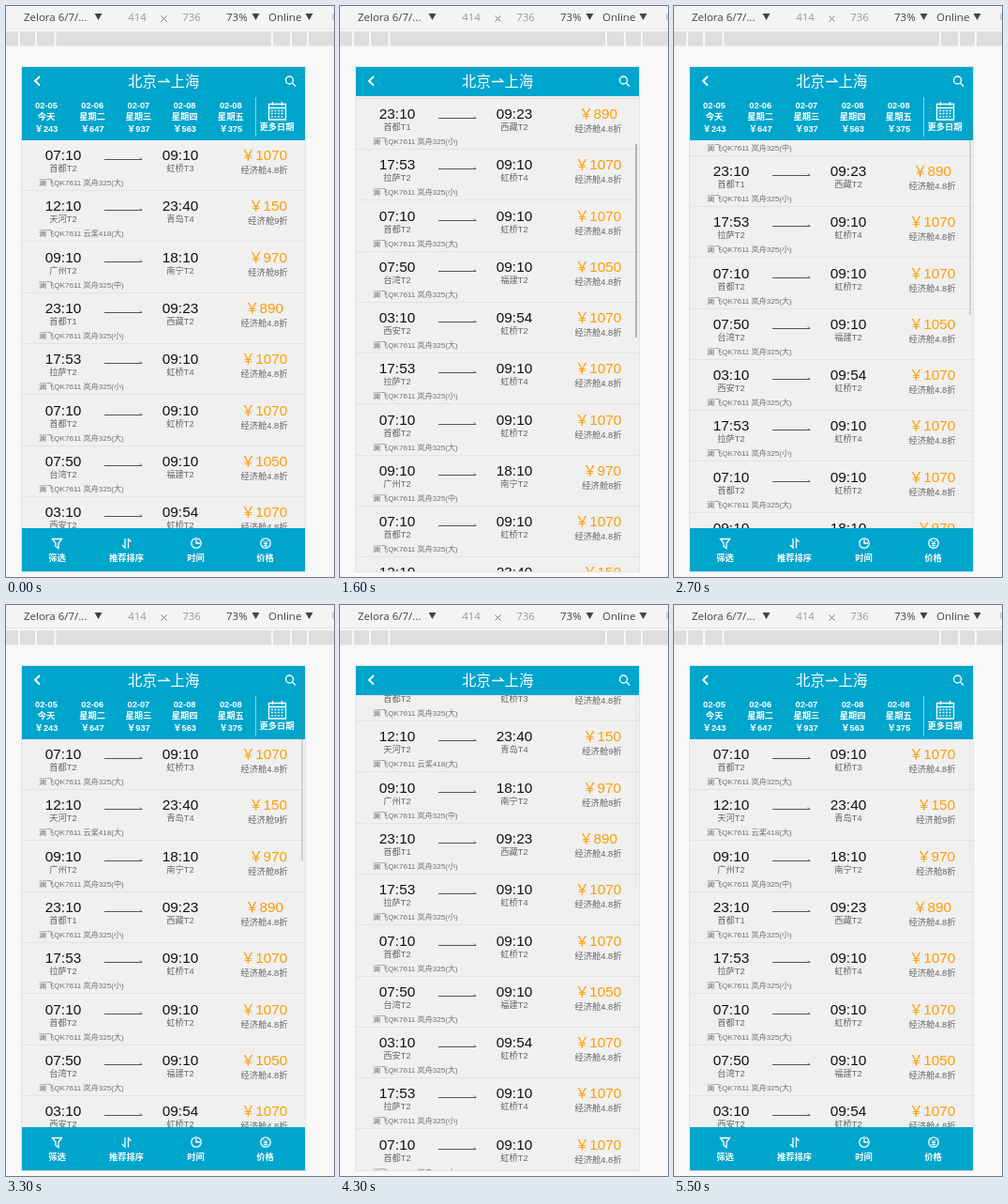
An HTML page that plays this animation: 350x608 px, repeating every 6.1 s.

```html
<!DOCTYPE html>
<html lang="zh-CN">
<head>
<meta charset="utf-8">
<title>航班列表</title>
<style>
html, body { margin: 0; width: 100%; height: 100%; overflow: hidden; background: #f8f8f8; }
svg { display: block; font: 9.3px "Liberation Sans", "Noto Sans CJK SC", "Noto Sans CJK", sans-serif; }
text { white-space: pre; }
.mid { text-anchor: middle; }
.tool { font: 11.5px "Open Sans", "Noto Sans", sans-serif; fill: #444; }
.time { font-size: 15.4px; fill: #111; }
.price { font-size: 15.3px; fill: #ff9c00; }
.note { fill: #666; }
.plane { font-size: 8.1px; fill: #707070; }
.title { font-size: 15.4px; font-weight: 500; }
.bar { fill: #fff; }
.bold { font-weight: bold; }
.icon { fill: none; stroke: #fff; stroke-width: 1.3; }
</style>
</head>
<body>
<svg width="350" height="608" viewBox="0 0 350 608">
  <defs>
    <clipPath id="screen"><rect x="17" y="65" width="302" height="537"/></clipPath>
  </defs>

  <g class="tool">
    <rect width="350" height="24" fill="#f4f4f4"/>
    <text x="19" y="16">Zelora 6/7/...</text>
    <text x="140" y="16" class="mid" fill="#999">414</text>
    <path d="M165.500 10.500l6 6m0-6l-6 6" stroke="#777"/>
    <text x="198" y="16" class="mid" fill="#999">736</text>
    <text x="235" y="16">73%</text>
    <text x="280" y="16">Online</text>
    <path d="M94.500 8h8l-4 7zM262.500 8h8l-4 7zM319.500 8h8l-4 7z"/>
    <path d="M349 8v7" stroke="#aaa"/>
  </g>
  <path d="M0 24.500H350" stroke="#e4e4e4"/>
  <rect y="27" width="350" height="15.500" fill="#dedede"/>
  <path d="M14 27v16M32 27v16M52.500 27v16M284 27v16M304 27v16M322 27v16" stroke="#f8f8f8" stroke-width="2"/>

  <rect x="16" y="64" width="304" height="539" fill="#e2e2e2"/>
  <g clip-path="url(#screen)">
    <rect x="17" y="65" width="302" height="537" fill="#f0f0f0"/>
    <g id="list"></g>

    <g id="dates" class="bar mid bold">
      <rect x="17" y="95" width="302" height="48" fill="#00a5cc"/>
      <path d="M266.500 97v42" stroke="#8bd3e6"/>
      <path class="icon" d="M280.500 104.500h18v16.500h-18zM280.500 108.500h18M284.500 102v4M294.500 102v4"/>
      <path class="icon" stroke-dasharray="2 1.500" d="M283 111.500h14M283 114.500h14M283 117.800h14"/>
      <text x="289" y="132">更多日期</text>
    </g>

    <g id="tabs" class="bar mid bold">
      <rect x="17" y="556" width="302" height="46" fill="#00a5cc"/>
      <path class="icon" d="M49.500 567.500h10l-3.500 4.500v5.500l-3-2v-3.500z"/>
      <path class="icon" d="M127 567v10l-3-3M130.500 577.500v-10l3 3"/>
      <g class="icon">
        <circle cx="203" cy="572" r="5.200"/><path d="M203 568v4h4"/>
        <circle cx="277" cy="572" r="5.200"/><path d="M274.500 569l2.500 3 2.500-3M277 572v4M274.700 572.500h4.600M274.700 574.500h4.600" stroke-width="1"/>
      </g>
    </g>

    <g class="bar">
      <rect x="17" y="65" width="302" height="31" fill="#00a5cc"/>
      <path class="icon" d="M36 75l-5 4.800 5 4.800" style="stroke-width:2"/>
      <text class="title" x="130" y="86">北京</text>
      <text class="title" x="175.500" y="86">上海</text>
      <path class="icon" d="M162 80.500h12l-3.500-3"/>
      <circle class="icon" cx="302.500" cy="79" r="4"/>
      <path class="icon" d="M305.500 82l3.500 3.500"/>
    </g>
    <rect id="thumb" x="315" width="2" height="206" fill="#777"/>
  </g>
</svg>

<script>
const $ = id => document.getElementById(id);
const text = (x, y, cls, s) => `<text x="${x}" y="${y}" class="${cls}">${s}</text>`;

// departure, from, arrival, to, price, discount, size
const flights = `07:10 首都T2 09:10 虹桥T3 1070 4.8 大
12:10 天河T2 23:40 青岛T4 150 9 大
09:10 广州T2 18:10 南宁T2 970 8 中
23:10 首都T1 09:23 西藏T2 890 4.8 小
17:53 拉萨T2 09:10 虹桥T4 1070 4.8 小
07:10 首都T2 09:10 虹桥T2 1070 4.8 大
07:50 台湾T2 09:10 福建T2 1050 4.8 大
03:10 西安T2 09:54 虹桥T2 1070 4.8 大`.split("\n").map(s => s.split(" "));
const order = [..."01234567452512"];

$("list").innerHTML = order.map((n, i) => {
  const [dep, from, arr, to, price, off, size] = flights[n];
  const mid = off.length > 1 ? 275.5 : 279.5;
  const plane = dep === "12:10" ? "云桨418" : "岚舟325";
  return `<g transform="translate(0 ${Math.round(142.2 + i * 54.27)})">` +
    text(61, 21.5, "time mid", dep) + text(61, 34, "note mid", from) +
    text(186, 21.5, "time mid", arr) + text(186, 34, "note mid", to) +
    text(mid, 22, "price mid", "￥" + price) +
    text(mid, 36, "note mid", `经济舱${off}折`) +
    text(35, 49, "plane", `澜飞QK7611 ${plane}(${size})`) +
    `<path d="M105 21.500h40l-2-2" fill="none" stroke="#555"/>
    <path d="M17 54.500h302" stroke="#e3e3e3"/></g>`;
}).join("");

$("dates").innerHTML += ["02-05 今天 243", "02-06 星期二 647", "02-07 星期三 937",
  "02-08 星期四 563", "02-08 星期五 375"].map((s, i) => {
  const [date, day, price] = s.split(" ");
  return [date, day, "￥" + price]
    .map((line, k) => text(43 + i * 49.2, 108.5 + k * 12.5, "", line)).join("");
}).join("");

$("tabs").innerHTML += ["筛选", "推荐排序", "时间", "价格"]
  .map((s, i) => text(54.5 + i * 74, 590.5, "", s)).join("");

// Each move is [start ms, end ms, value reached].
const swipes = [[880, 1000, 77], [1490, 1700, 245], [1950, 2300, 146],
  [2760, 2900, 0], [3663, 3800, 73], [4860, 5000, 0]];
const toggles = [[825, 925, 1], [1925, 2025, 0], [3625, 3725, 1], [4825, 4925, 0]];

const clamp = x => Math.min(1, Math.max(0, x));
const linear = p => p;
const easeOut = p => 1 - (1 - p) ** 2;
const follow = (moves, t, ease) => moves.reduce(
  (value, [from, to, goal]) => value + (goal - value) * ease(clamp((t - from) / (to - from))), 0);

// The scrollbar fades once the list has rested.
function thumbAlpha(t) {
  const last = swipes.findLast(([from]) => from <= t);
  return last ? Math.max(.06, .5 * clamp((last[1] + 500 - t) / 200)) : 0;
}

const shift = (id, y) => $(id).setAttribute("transform", `translate(0 ${Math.round(y)})`);
const start = performance.now();

function draw() {
  const elapsed = Math.max(0, performance.now() - start) % 6100;
  const t = Math.floor(elapsed / 100) * 100; // ten pictures a second
  const scroll = follow(swipes, t, easeOut);
  const hidden = follow(toggles, t, linear);
  shift("list", -scroll);
  shift("dates", -78 * hidden);
  shift("tabs", 46 * hidden);
  $("thumb").setAttribute("y", Math.round(67 + scroll * .385));
  $("thumb").setAttribute("opacity", thumbAlpha(t));
  requestAnimationFrame(draw);
}
draw();
</script>
</body>
</html>
```
